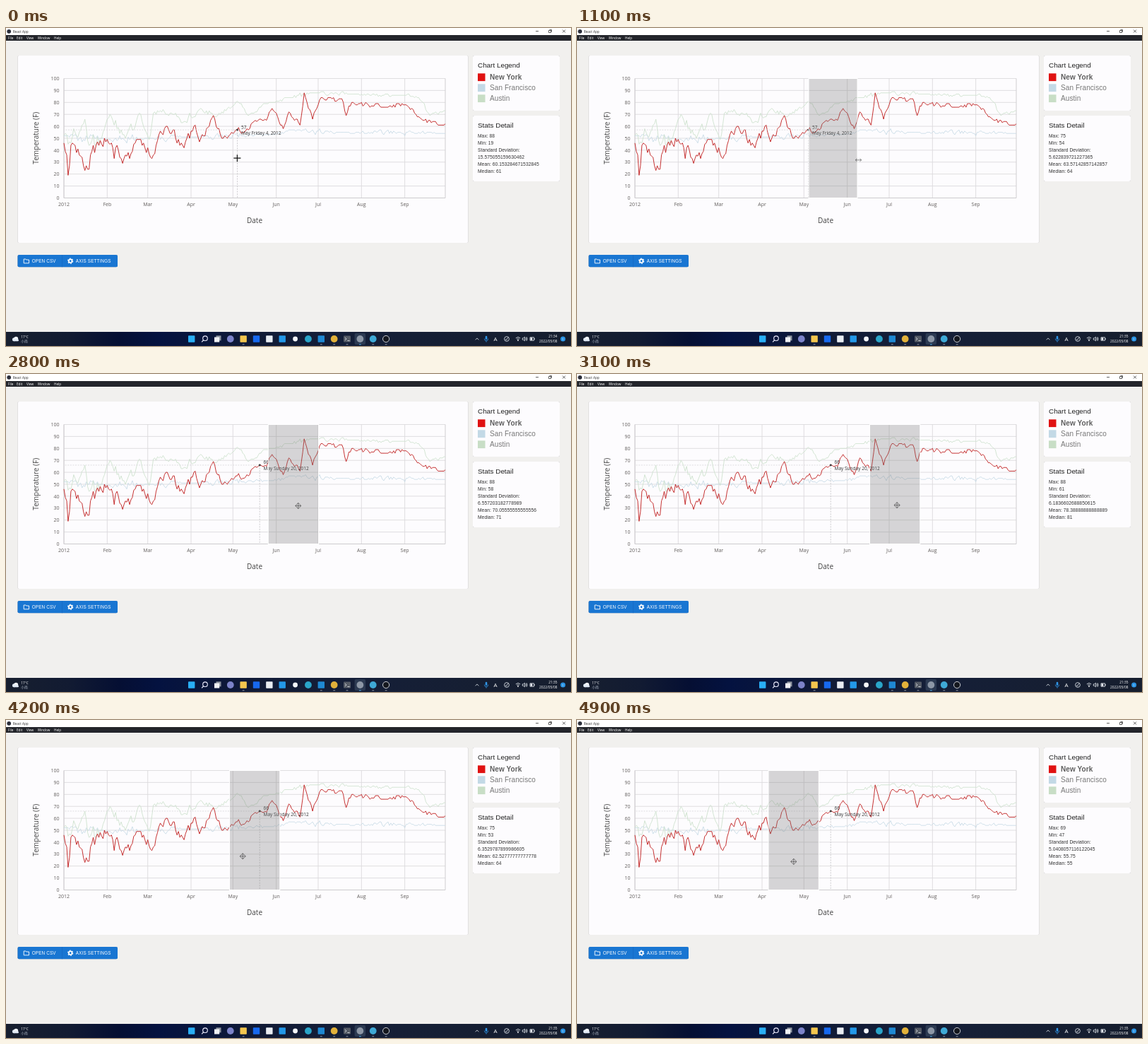
An HTML page that plays this animation: 800 by 450 pixels, repeating every 5000 ms.

```html
<!DOCTYPE html>
<html lang="en">
<head>
<meta charset="utf-8">
<title>React App</title>
<style>
html, body { margin: 0; width: 100%; height: 100%; overflow: hidden; background: #f1f0ee; }
svg { display: block; width: 100vw; height: 100vh; }
text { white-space: pre; }
.ui { font-family: "Open Sans", "Noto Sans CJK SC", "Noto Sans CJK", sans-serif; }
.mui { font-family: "Liberation Sans", Arial, sans-serif; }
.card { fill: #fdfcfe; filter: drop-shadow(0 .8px .5px rgba(0,0,0,.36)); }
.series { fill: none; stroke-width: .9; stroke-linejoin: round; }
.glyph { fill: none; stroke: #e8ecf2; stroke-width: .8; }
</style>
</head>
<body>
<svg id="stage" viewBox="0 0 800 450" xmlns="http://www.w3.org/2000/svg">
<defs>
  <linearGradient id="bar">
    <stop offset="0" stop-color="#171f2f"/><stop offset=".11" stop-color="#121b32"/>
    <stop offset=".2" stop-color="#050f33"/><stop offset=".27" stop-color="#041240"/>
    <stop offset=".45" stop-color="#111b36"/><stop offset=".62" stop-color="#151f38"/>
    <stop offset="1" stop-color="#161e2e"/>
  </linearGradient>
</defs>
<g id="scene"></g>
<g id="tip"></g>
<rect id="brush" y="71.5" height="169" fill="#777" fill-opacity=".3" stroke="#fff"/>
<g id="stats"></g>
<g id="clock"></g>
<path id="cursor" fill="none"/>
</svg>
<script>
const LOOP = 5000, X0 = 82, Y0 = 240.5, LAST = 273, DAY = 540 / LAST, DEG = 1.69;
const $ = id => document.getElementById(id);
const px = day => X0 + day * DAY;
const py = temp => Y0 - temp * DEG;

// Segment of a key list around t, and how far t is through it
function segment(keys, t) {
  let i = 1;
  while (i < keys.length - 1 && keys[i][0] < t) i++;
  const [a, b] = [keys[i - 1], keys[i]];
  return { a, b, p: Math.min(1, Math.max(0, (t - a[0]) / (b[0] - a[0]))) };
}

function along(keys, t) {
  const { a, b, p } = segment(keys, t);
  return a[1] + (b[1] - a[1]) * p;
}

function seeded(seed) {
  return () => (seed = seed * 16807 % 2147483647) / 2147483647 * 2 - 1;
}

// Daily weather: passes through the key days and wanders between them
function weather(keys, seed, winter, summer) {
  const rnd = seeded(seed);
  let drift = 0;
  return Array.from({ length: LAST + 1 }, (_, day) => {
    drift = drift * .45 + rnd();
    const amount = winter + (summer - winter) * Math.min(1, day / 125);
    return Math.round(along(keys, day) + drift * amount * Math.sin(Math.PI * segment(keys, day).p));
  });
}

const NEW_YORK = weather([[0,46],[3,19],[6,46],[15,23],[24,47],[31,49],[42,29],[54,49],[63,33],[73,60],[86,42],
  [94,61],[97,47],[107,69],[113,50],[124,57],[127,54],[140,66],[145,65],[149,75],[157,58],[161,72],[169,61],
  [172,88],[178,66],[184,84],[199,83],[202,69],[206,80],[230,76],[245,78],[255,67],[268,61],[273,62]], 1234577, 9, 2.4);
const BAY = weather([[0,52],[30,49],[60,50],[90,51],[150,53],[162,57],[200,55],[273,54]], 7654321, 4, 2);
const AUSTIN = weather([[0,52],[3,45],[15,66],[18,44],[27,50],[33,70],[44,50],[54,71],[61,49],[64,71],[78,70],
  [85,63],[98,75],[109,68],[124,81],[132,69],[147,80],[162,84],[178,88],[208,87],[240,86],[254,84],[262,69],
  [273,73]], 2468013, 7, 2);

const text = (x, y, s, size, fill, cls = "ui", more = "") =>
  `<text x="${x}" y="${y}" font-size="${size}" fill="${fill}" class="${cls}" ${more}>${s}</text>`;
const rect = (x, y, w, h, fill, more = "") =>
  `<rect x="${x}" y="${y}" width="${w}" height="${h}" fill="${fill}" ${more}/>`;
const card = (x, y, w, h) => rect(x, y, w, h, "#fff", 'rx="2" class="card"');
const dot = (x, y, r, fill, more = "") => `<circle cx="${x}" cy="${y}" r="${r}" fill="${fill}" ${more}/>`;
const path = (d, more = 'class="glyph"') => `<path d="${d}" ${more}/>`;
const curve = (temps, color) =>
  path("M" + temps.map((v, day) => px(day).toFixed(1) + " " + py(v).toFixed(1)).join("L"),
    `class="series" stroke="${color}"`);

function windowFrame() {
  let s = rect(0, 0, 800, 450, "#f1f0ee") + rect(0, 0, 800, 10, "#fff") + rect(0, 10, 800, 8, "#23252b");
  s += dot(4.2, 4.8, 2.9, "#2b2e3a") + text(9.7, 6.6, "React App", 4.7, "#333");
  s += path("M750 4.5h4M788 2.5l4 4m0-4l-4 4M768.5 3.5h3v3h-3zM769.5 2.5h3v3",
    'fill="none" stroke="#222" stroke-width=".7"');
  [["File", 3], ["Edit", 15], ["View", 29], ["Window", 44.7], ["Help", 68]]
    .forEach(([name, x]) => s += text(x, 15.8, name, 4.7, "#fff"));
  return s;
}

function chart() {
  let s = card(16.5, 39, 638, 265);
  const mid = 'text-anchor="middle"', end = 'text-anchor="end"', grid = 'stroke="#dcdbdd" stroke-width=".9"';
  for (let v = 0; v <= 100; v += 10) {
    s += path(`M${X0} ${py(v)}H622`, grid) + text(75.6, py(v) + 2.6, v, 7, "#635f5d", "ui", end);
  }
  ["2012", "Feb", "Mar", "Apr", "May", "Jun", "Jul", "Aug", "Sep"].forEach((name, m) => {
    const x = px((Date.UTC(2012, m, 1) - Date.UTC(2012, 0, 1)) / 864e5).toFixed(1);
    s += path(`M${x} 71.5V${Y0}`, grid) + text(x, 252.3, name, 7, "#635f5d", "ui", mid);
  });
  s += path("M82 71.5V240.5H622V71.5", 'fill="none" stroke="#cbcacc" stroke-width=".9"');
  s += text(352, 276, "Date", 10, "#444", "ui", mid);
  s += text(0, 0, "Temperature (F)", 10, "#444", "ui", mid + ' transform="translate(46.3 155.8) rotate(-90)"');
  return s + curve(BAY, "#c9dce7") + curve(AUSTIN, "#cfe3cf") + curve(NEW_YORK, "#c01c1c");
}

function sidePanels() {
  let s = card(661, 39, 123, 78) + card(661, 124, 123, 93);
  s += text(668, 55.5, "Chart Legend", 9.9, "#222", "mui") + text(668, 140.5, "Stats Detail", 9.9, "#222", "mui");
  [["New York", "#e01212"], ["San Francisco", "#c3d9e6"], ["Austin", "#c8dec6"]].forEach(([name, color], i) => {
    s += rect(668, 64.3 + i * 15, 10.5, 10.8, color);
    s += text(685, 73.2 + i * 15, name, 10, i ? "#777" : "#5f5f5f", "mui",
      `font-weight="${i ? "normal" : "bold"}" letter-spacing=".08"`);
  });
  return s;
}

function buttons() {
  let s = rect(16.5, 321, 141.5, 17.3, "#1976d2",
    'rx="2" style="filter:drop-shadow(0 .7px .6px rgba(0,0,0,.35))"');
  s += path("M79.5 321V338.3", 'stroke="#1565c0" stroke-width=".6"');
  s += path("M25.2 327h2.7l1 1h3.6v4.8h-7.3z", 'fill="none" stroke="#fff" stroke-width=".9"');
  s += dot(91.2, 329.7, 2.3, "none", 'stroke="#fff" stroke-width="1.7"');
  s += dot(91.2, 329.7, 3.6, "none", 'stroke="#fff" stroke-width="1.1" stroke-dasharray="1.9 1.87"');
  [["OPEN CSV", 36.7], ["AXIS SETTINGS", 98.8]].forEach(([label, x]) =>
    s += text(x, 332, label, 6.3, "#fff", "mui", 'letter-spacing=".18"'));
  return s;
}

function taskbar() {
  const slot = i => 262.7 + i * 18.36;
  let s = rect(0, 430, 800, 20, "url(#bar)");
  s += dot(11.4, 440.7, 2.5, "#dfe8f4") + dot(14.2, 439.8, 3, "#f2f6fb") + rect(10, 440.5, 8, 2.8, "#dfe8f4", 'rx="1.4"');
  s += text(21.3, 438.7, "17°C", 4.7, "#fff") + text(21.3, 445.2, "小雨", 4.8, "#aab3c2");
  s += rect(slot(13) - 7.8, 432, 15.5, 16, "#2c3a52", 'rx="2"');
  s += dot(282, 439.2, 3.3, "none", 'stroke="#eef" stroke-width="1.1"') +
    path("M279.7 441.6l-2.6 2.7", 'stroke="#eef" stroke-width="1.2"');
  s += rect(297.5, 435.3, 7, 7, "#8d949f") + rect(295, 437.5, 7.2, 7, "#f0f2f5");
  // app marks as plain discs and squares
  [[3, "#7c83c9"], [9, "#2aa5c9"], [11, "#e2b13a"], [13, "#8d97a6"], [14, "#3fa9d6"]]
    .forEach(([i, c]) => s += dot(slot(i), 440, 4.9, c));
  [[0, "#29aef5"], [4, "#f4c64e"], [5, "#1769ef"], [6, "#e9edf2"], [7, "#2398e8"], [10, "#1f88d2"]]
    .forEach(([i, c]) => s += rect(slot(i) - 4.7, 435.3, 9.4, 9.4, c, 'rx=".8"'));
  s += dot(slot(8), 440, 3.4, "#f4f6fa");
  s += rect(478, 435.6, 10, 8.8, "#555b66", 'rx="1"') + path("M480 438l2 2-2 2m3.5.5h3");
  s += dot(slot(15), 440, 4.6, "#15181f", 'stroke="#c9ccd2" stroke-width="1"');
  [4, 10, 11, 12, 13, 14, 15].forEach(i =>
    s += rect(slot(i) - 1.5, 447.2, 3, 1, i === 13 ? "#55b7f2" : "#9299a5", 'rx=".5"'));
  s += path("M664.6 441.3l2.4-2.4 2.4 2.4");
  s += rect(678.7, 435.7, 2.6, 5.2, "#2f96e8", 'rx="1.3"') +
    path("M677.3 439.6q0 3 2.7 3t2.7-3M680 442.6v2", 'fill="none" stroke="#2f96e8" stroke-width=".8"');
  s += text(690.4, 443, "A", 8, "#fff") + dot(709, 440, 3.4, "none", 'class="glyph"') + path("M709 440l2.4-2.4M706.8 441h3");
  s += path("M721.8 438.8q3.2-3 6.4 0M723.1 440.4q1.9-1.7 3.8 0") + dot(725, 442, .9, "#fff");
  s += path("M731.3 438.8h1.3l1.8-1.6v5.6l-1.8-1.6h-1.3zM735.8 438.2q1.5 1.8 0 3.6M737 437.2q2.3 2.8 0 5.6");
  s += path("M742 437.8h5.6v4.4H742z") + rect(742.5, 438.2, 2.8, 3.6, "#e8ecf2") + rect(748, 439.2, .8, 1.6, "#e8ecf2");
  s += dot(788.6, 440, 3.5, "#2c95e6") + text(788.6, 441.7, "1", 4.3, "#fff", "ui", 'text-anchor="middle"');
  return s;
}

// Draw the selection, stretch it a little, rest, then drag it about
const DRAG = 2500, GRIP = 31, LAG = 80;
const leftKeys = [[DRAG,328],[3100,414.5],[3200,424],[3450,347],[3650,415],[3800,391],[4200,316.5],[4600,255],
  [4900,271],[5000,277]];
const widthKeys = [[200,0],[1100,69],[1300,71.3]];
const approachKeys = [[200,327.4],[1100,398.5],[1400,399.3],[2000,360],[DRAG,359]];
const heightKeys = [[0,184.2],[2000,189],[3100,185.6],[3800,188.5],[4900,200.4]];

const pointerX = t => t < DRAG ? along(approachKeys, t) : along(leftKeys, t + LAG) + GRIP;

// The readout freezes during drags and trails the pointer while hovering
function hoverDay(t) {
  const x = pointerX(t < 1400 ? 0 : Math.min(t, DRAG) - 140);
  return Math.round((x - X0) / DAY);
}

function summary(from, until) {
  const temps = NEW_YORK.slice(from, until + 1).sort((a, b) => a - b);
  const n = temps.length, mean = temps.reduce((a, b) => a + b) / n;
  const spread = Math.sqrt(temps.reduce((a, v) => a + (v - mean) ** 2, 0) / n);
  const median = (temps[n >> 1] + temps[(n - 1) >> 1]) / 2;
  return [`Max: ${temps[n - 1]}`, `Min: ${temps[0]}`, "Standard Deviation:", spread, `Mean: ${mean}`, `Median: ${median}`];
}

function tooltip(day) {
  const v = NEW_YORK[day], x = px(day) + .3, y = py(v);
  const date = new Date(Date.UTC(2012, 0, 1 + day));
  const part = opt => date.toLocaleDateString("en-US", { timeZone: "UTC", ...opt });
  const label = `${part({ month: "long" })} ${part({ weekday: "long" })} ${date.getUTCDate()}, 2012`;
  const dash = 'stroke-width=".8" stroke-dasharray="2 1.6" stroke=';
  return path(`M${x} ${y}V${Y0}`, dash + '"#c2c1c3"') + path(`M${x} ${y}H${X0}`, dash + '"#d6d5d7"') +
    dot(x, y, 1.1, "#555", 'stroke="#222" stroke-width=".7"') +
    text(x + 5.4, y - 1.6, v, 6.5, "#333") + text(x + 5.4, y + 6.6, label, 6.5, "#333");
}

const CROSS = "M-5 0H5M0-5V5";
const RESIZE = "M-4 0H4M-2-2L-4.2 0L-2 2M2-2L4.2 0L2 2";
const MOVE = RESIZE + "M0-4V4M-2-2L0-4.2L2-2M-2 2L0 4.2L2 2";

function draw(now) {
  const t = Math.floor(now % LOOP / 100) * 100;
  const left = along(leftKeys, t), width = along(widthKeys, t), selected = t > 200;
  const brush = $("brush");
  brush.setAttribute("x", left);
  brush.setAttribute("width", width);
  brush.style.display = selected ? "" : "none";

  $("tip").innerHTML = tooltip(hoverDay(t));

  const range = selected ? [Math.ceil((left - X0) / DAY), Math.floor((left + width - X0) / DAY)] : [0, LAST];
  $("stats").innerHTML = summary(...range)
    .map((s, i) => text(668, 154.5 + i * 10, s, 6.7, "#333", "mui", 'letter-spacing=".05"')).join("");

  const end = 'text-anchor="end"';
  $("clock").innerHTML = text(780.5, 438.4, t < 300 ? "21:34" : "21:35", 4.8, "#fff", "ui", end) +
    text(780.5, 445.2, "2022/05/08", 4.8, "#fff", "ui", end);

  const cursor = $("cursor"), cross = t < 1000;
  cursor.setAttribute("d", cross ? CROSS : t < 1500 ? RESIZE : MOVE);
  cursor.setAttribute("stroke", cross ? "#111" : "#444");
  cursor.setAttribute("stroke-width", cross ? 1.2 : .65);
  cursor.setAttribute("transform", `translate(${pointerX(t)} ${along(heightKeys, t)})`);
}

$("scene").innerHTML = windowFrame() + chart() + sidePanels() + buttons() + taskbar();
const start = performance.now();
function tick() {
  draw(performance.now() - start);
  requestAnimationFrame(tick);
}
tick();
</script>
</body>
</html>
```
